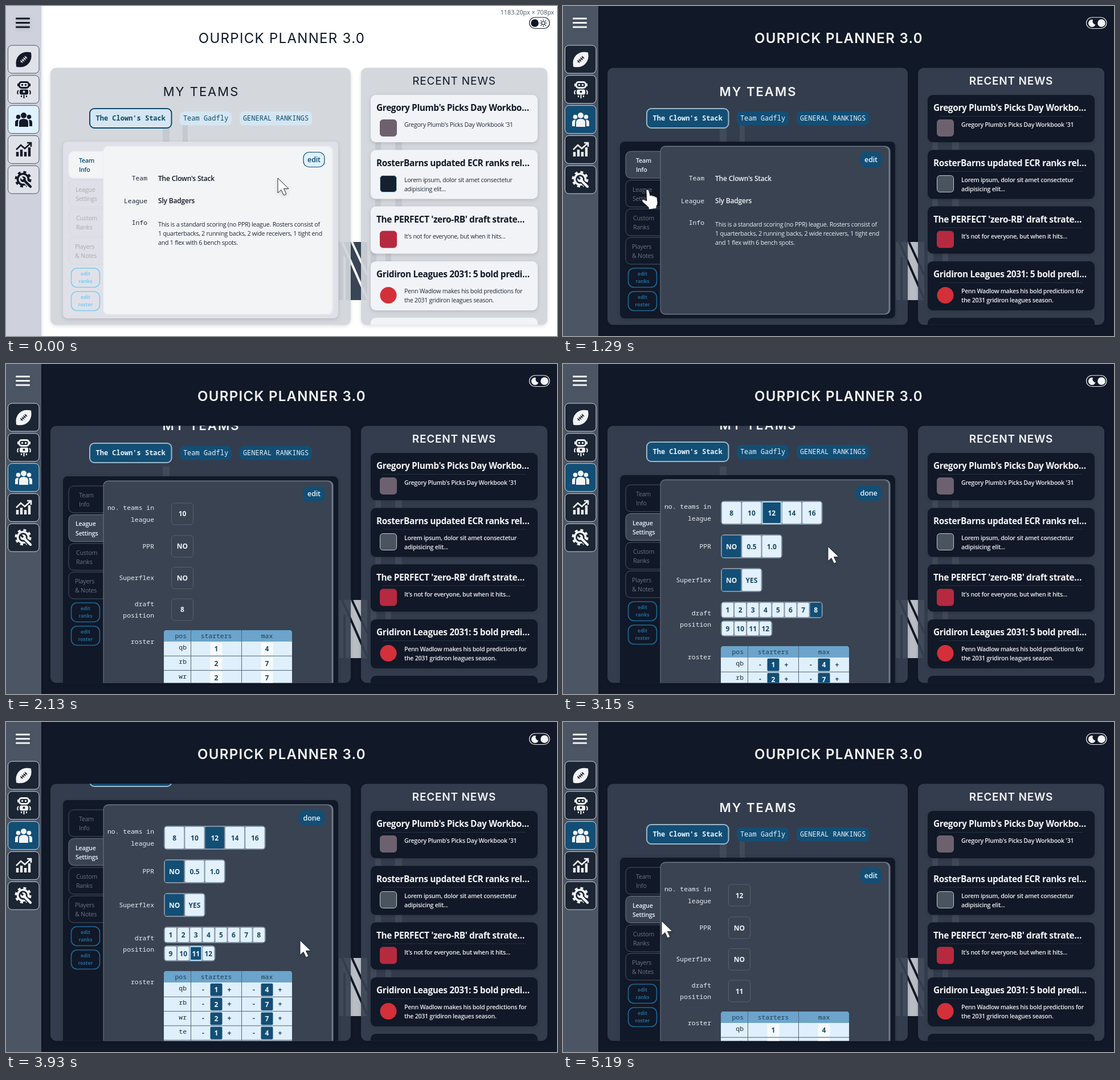
Animation of 967 by 579 pixels, one loop 5.22 s. Source, as an HTML page:

```html
<!DOCTYPE html>
<html lang="en">
<head>
<meta charset="utf-8">
<title>Team dashboard</title>
<style>
html, body { margin: 0; width: 100%; height: 100%; overflow: hidden; }
svg { display: block; width: 100vw; height: 100vh; background: var(--bg); }
text { font-family: "Open Sans", "Noto Sans", sans-serif; fill: var(--ink); white-space: pre; }
.mono { font: 11.4px "Noto Sans Mono", "DejaVu Sans Mono", monospace; fill: var(--body); }
.pill { font-size: 12px; fill: var(--blueInk); }
.bold { font-weight: 700; }
.display { font-family: Inter, sans-serif; font-weight: var(--display); }
.head { font-size: 15.4px; font-weight: 700; letter-spacing: -.35px; }
.copy { font-size: 10.6px; font-weight: var(--weight); letter-spacing: -.27px; fill: var(--body); }
.para { font-size: 10.7px; letter-spacing: -.25px; fill: var(--body); }
.value { font-size: 12px; font-weight: 600; letter-spacing: -.2px; }
.tab { font-size: 10.7px; letter-spacing: -.25px; fill: var(--faint); }
.tab.on { fill: var(--blueInk); font-weight: 600; }
.link { font-size: 8.6px; font-weight: 700; fill: var(--link); }
.action { font-size: 12.6px; font-weight: 600; letter-spacing: -.2px; fill: var(--blueInk); }
.num { font-size: 12px; font-weight: 700; fill: #174766; }
.num.lit { fill: #f0f8ff; }
.num.plain { fill: var(--ink); }
.th { fill: #1d3d55; }
.td { fill: #1f2937; }
.mid { text-anchor: middle; }
.end { text-anchor: end; }
.soft { filter: drop-shadow(0 2px 3px rgba(0, 0, 0, .14)); }
</style>
</head>
<body>
<svg id="stage" viewBox="0 0 967 579" preserveAspectRatio="none"></svg>
<script>
const LOOP = 5220;
const stage = document.getElementById('stage');

// Each entry: light colour, dark colour.
const palette = {
  bg: ['ffffff', '111827'], side: ['cfd2dc', '4b5563'], panel: ['d1d5db', '374151'],
  card: ['e0e1e8', '111827'], news: ['f2f3f6', '111827'], rule: ['f2f3f6', '283241'],
  sheet: ['f3f4f6', '394352'], sheetEdge: ['ebecf0', '717a88'],
  ink: ['111827', 'f3f4f6'], body: ['1f2937', 'eceef1'],
  button: ['e0e2e9', '1b2533'], buttonEdge: ['4b5563', 'd1d5db'],
  active: ['dff1fe', '134e75'], pill: ['d5e6f2', '134e75'],
  blueInk: ['0c4a6e', 'e8f4fd'], pillEdge: ['0c4a6e', '9bb9cb'],
  actionEdge: ['0c4a6e', '134e75'], link: ['7dccf7', '1d6a9a'],
  faint: ['a8abb3', '6b7280'], tabEdge: ['d6d8df', '4b5563'], tabFill: ['dfe0e7', '111827'],
  decor: ['3a4657', 'b9bdc4'], emblem: ['14202f', '4a545f'], emblemEdge: ['9ecdea', 'c3c9d0']
};

const v = name => `var(--${name})`;
const rect = (x, y, w, h, r, fill, extra = '') =>
  `<rect x="${x}" y="${y}" width="${w}" height="${h}" rx="${r}" fill="${fill}" ${extra}/>`;
const text = (x, y, str, cls, extra = '') => `<text x="${x}" y="${y}" class="${cls}" ${extra}>${str}</text>`;
const lines = (x, y, step, strs, cls) => strs.map((s, i) => text(x, y + i * step, s, cls)).join('');
const path = (d, fill, extra = '') => `<path d="${d}" fill="${fill}" ${extra}/>`;
const circle = (x, y, r, fill, extra = '') => `<circle cx="${x}" cy="${y}" r="${r}" fill="${fill}" ${extra}/>`;
const stroke = (color, width = 1) => `stroke="${color}" stroke-width="${width}"`;

function backdrop() {
  const bars = [[275, 180, 12, 62], [310, 205, 9, 37], [648, 160, 10, 192], [683, 160, 12, 192],
    [640, 430, 10, 20], [666, 430, 10, 20]];
  return bars.map(([x, y, w, h]) => rect(x, y, w, h, 0, v('decor'))).join('') +
    rect(584, 414, 50, 102, 0, v('decor')) +
    path('M590 414L634 514M607 414L634 472M594 440V516', 'none', stroke(v('bg'), 4));
}

const icons = [
  `<g transform="rotate(-44 31 94)">${path('M13 94Q20 83 31 83T49 94Q42 105 31 105T13 94Z', v('ink'))}
    ${path('M24 94H38M26 91V97M29.500 91V97M33 91V97M36.500 91V97', 'none', stroke(v('button'), 1.4))}</g>`,
  rect(22, 132, 19, 13, 5, v('ink')) + rect(24.5, 135, 14, 7, 3, v('button')) +
    circle(28.5, 138.5, 1.7, v('ink')) + circle(34.500, 138.5, 1.7, v('ink')) +
    rect(24, 146.500, 15, 9, 3, v('ink')) + circle(31.5, 150.5, 2, v('button')) +
    path('M21 136V141M42 136V141M22 148Q19 150 21 155M41 148Q44 150 42 155M27 157V160M31.500 156V162M36 157V160',
      'none', stroke(v('ink'), 2)),
  circle(31, 192, 5, v('ink')) + circle(21.5, 194.5, 3.8, v('ink')) + circle(40.5, 194.5, 3.8, v('ink')) +
    path('M23 212V204Q23 198 31 198T39 204V212ZM16 211V204Q16 199.500 22 199.500Q21 202 21 211ZM46 211V204Q46 199.500 40 199.500Q41 202 41 211Z', v('ink')),
  path('M20 264V256M27 264V252M34 264V256M41 264V248', 'none', stroke(v('ink'), 4.4)) +
    path('M18 252L26 244L33 250L43 241M37 240H44V247', 'none', stroke(v('ink'), 2.6)),
  circle(30, 304, 9.5, 'none', stroke(v('ink'), 3.6)) +
    circle(30, 304, 12.7, 'none', stroke(v('ink'), 3.6) + ' stroke-dasharray="4.990"') +
    path('M32 306L44 318', 'none', stroke(v('button'), 8)) +
    path('M31 305L43 317', 'none', stroke(v('ink'), 4.4) + ' stroke-linecap="round"') +
    circle(30, 304, 5, v('ink')) + path('M30 304L25 299', 'none', stroke(v('button'), 3.2))
];

function sidebar() {
  return `<g class="soft">${rect(-5, -5, 67, 590, 0, v('side'))}</g>` +
    [22, 29.5, 37].map(y => rect(17, y - 1.5, 25, 3, 1, v('ink'), 'class="soft"')).join('') +
    icons.map((icon, i) => rect(3.5, 69 + i * 52.8, 54.5, 49, 7, v(i === 2 ? 'active' : 'button'),
      stroke(v('buttonEdge'))) + icon).join('');
}

function newsCard(y, h, title, copy, emblem) {
  const cy = y + (copy.length > 1 ? 59.5 : 58);
  return rect(640, y, 293, h, 9, v('news'), 'class="soft"') + text(650, y + 28, title, 'head') +
    rect(661, y + 37, 251, 1, 0, v('rule')) + emblem(671, cy) +
    lines(699, y + 56, 16.3, copy, 'copy');
}

const square = (fill, edge = fill) => (x, y) => rect(x - 14.5, y - 14.5, 29, 29, 5, fill, stroke(edge));

function newsPanel() {
  return rect(623, 108.5, 327, 451, 10, v('panel'), 'opacity=".92" class="soft"') +
    text(786.5, 137.5, 'RECENT NEWS', 'display mid', 'font-size="19" letter-spacing=".8"') +
    `<g clip-path="url(#newsClip)">` +
    newsCard(156, 83, 'Gregory Plumb\'s Picks Day Workbo…', ['Gregory Plumb\'s Picks Day Workbook \'31'], square('#6d6170')) +
    newsCard(252.5, 86, 'RosterBarns updated ECR ranks rel…',
      ['Lorem ipsum, dolor sit amet consectetur', 'adipisicing elit...'], square(v('emblem'), v('emblemEdge'))) +
    newsCard(351.5, 83, 'The PERFECT \'zero-RB\' draft strate…', ['It\'s not for everyone, but when it hits...'], square('#b52a3f')) +
    newsCard(448, 86, 'Gridiron Leagues 2031: 5 bold predi…',
      ['Penn Wadlow makes his bold predictions for', 'the 2031 gridiron leagues season.'],
      (x, y) => circle(x, y, 14.5, '#d3303a')) +
    rect(640, 547, 293, 40, 9, v('news')) + '</g>';
}

function segments(y, h, pitch, labels, picked, focused) {
  const cells = labels.map((label, i) => {
    const x = 278 + i * pitch, on = label === picked;
    return rect(x + 1, y + 2, pitch - 2, h - 4, 2, on ? '#134e75' : '#e2f1fc',
      on && focused ? stroke('#a9d8f3', 2) : '') +
      text(x + pitch / 2, y + h / 2 + 4.5, label, on ? 'num lit mid' : 'num mid');
  });
  return rect(277, y, labels.length * pitch + 2, h, 6, '#8292a1') + cells.join('');
}

function roster(y, editing) {
  const rows = [['qb', 1, 4], ['rb', 2, 7], ['wr', 2, 7], ['te', 1, 4], ['flex', 1, ''], ['k', 1, 3], ['dst', 1, 3]];
  const rowH = 25.3, columns = [369, 458];
  const cell = (cx, cy, n) => {
    if (n === '') return editing ? text(cx, cy + 4, '-  -  +', 'num mid', 'opacity=".15"') : '';
    return rect(cx - 10.5, cy - 11, 21, 22, 2, editing ? '#134e75' : '#f8fbfe') +
      text(cx, cy + 4.5, n, editing ? 'num lit mid' : 'num mid') +
      (editing ? text(cx - 23, cy + 4, '-', 'num mid') + text(cx + 23, cy + 4, '+', 'num mid') : '');
  };
  const height = 20 + rows.length * rowH;
  return rect(277, y, 225, height, 5, '#dfeffb') + path(`M277 ${y + 20}V${y + 5}q0-5 5-5H497q5 0 5 5V${y + 20}Z`, '#6ca4cb') +
    text(317, y + 14, 'pos', 'mono th end') + text(369, y + 14, 'starters', 'mono th mid') + text(458, y + 14, 'max', 'mono th mid') +
    rows.map(([pos, ...counts], i) => {
      const top = y + 20 + i * rowH;
      return text(317, top + 14, pos, 'mono td end') + columns.map((cx, c) => cell(cx, top + 12.8, counts[c])).join('') +
        path(`M277 ${top + rowH}H502`, 'none', stroke('#53677a'));
    }).join('') + path(`M324.500 ${y}V${y + height}M413.500 ${y}V${y + height}`, 'none', stroke('#53677a'));
}

const settingLabels = (ppr, flex, draft, table) =>
  lines(260, 297, 21, ['no. teams in', 'league'], 'mono end') + text(260, ppr, 'PPR', 'mono end') +
  text(260, flex, 'Superflex', 'mono end') + lines(260, draft, 20, ['draft', 'position'], 'mono end') +
  text(260, table, 'roster', 'mono end');

const pages = {
  info: () => text(248, 306, 'Team', 'mono end') + text(267, 307, 'The Clown\'s Stack', 'value') +
    text(248, 345.5, 'League', 'mono end') + text(267, 346, 'Sly Badgers', 'value') + text(248, 384, 'Info', 'mono end') +
    lines(267, 386.5, 16.3, ['This is a standard scoring (no PPR) league. Rosters consist of',
      '1 quarterbacks, 2 running backs, 2 wide receivers, 1 tight end', 'and 1 flex with 6 bench spots.'], 'para'),
  view: s => settingLabels(365, 420, 466, 532) +
    [[285, s.teams], [342, 'NO'], [397.5, 'NO'], [453, s.slot]].map(([y, value]) =>
      rect(290.5, y, 38, 38, 5, v('sheet'), stroke('#576170')) + text(309.5, y + 23.5, value, 'num plain mid')).join('') +
    roster(508, false),
  edit: s => {
    const slots = Array.from({ length: s.teams }, (_, i) => i + 1);
    return settingLabels(367, 426, 484, 561) +
      segments(283, 42, 35.3, [8, 10, 12, 14, 16], s.teams, s.focus === 'teams') +
      segments(342, 42, 35.3, ['NO', '0.5', '1.0'], 'NO') + segments(401, 42, 35.3, ['NO', 'YES'], 'NO') +
      segments(460, 29, 22.1, slots.slice(0, 8), s.slot, s.focus === 'slot') +
      segments(493, 28, 22.1, slots.slice(8), s.slot, s.focus === 'slot') + roster(538, true);
  }
};

function tab(y, x, labels, on) {
  return path(`M171 ${y}H120q-10 0-10 10V${y + 37}q0 10 10 10H171`, v(on ? 'sheet' : 'tabFill'),
    stroke(v(on ? 'sheetEdge' : 'tabEdge'))) + lines(x, y + 20, 16.2, labels, on ? 'tab on' : 'tab');
}

function teamPill(x, y, w, h, label, on) {
  return rect(x, y, w, h, 8, v('pill'), on ? stroke(v('pillEdge'), 2) : '') +
    text(x + w / 2, 201, label, 'mono pill mid' + (on ? ' bold' : ''), 'style="fill:var(--blueInk);font-size:12px"');
}

function teamContent(s) {
  const info = s.page === 'info', tall = info ? 0 : 400;
  const label = s.page === 'edit' ? 'done' : 'edit', w = s.page === 'edit' ? 45 : 37;
  return text(342.5, 157.5, 'MY TEAMS', 'display mid', 'font-size="22" letter-spacing="2"') +
    teamPill(147, 180, 143.5, 34, 'The Clown\'s Stack', true) +
    teamPill(305, 185, 91, 24.5, 'Team Gadfly') + teamPill(410, 185, 127, 24.5, 'GENERAL RANKINGS') +
    rect(100, 238, 483, 310 + tall, 8, v('card'), 'class="soft"') +
    tab(255, 128, ['Team', 'Info'], info) + tab(305.5, 122, ['League', 'Settings'], !info) +
    tab(356, 123, ['Custom', 'Ranks']) + tab(406, 121, ['Players', '&amp; Notes']) +
    [[460, 'ranks'], [501, 'roster']].map(([y, word]) => rect(114.5, y, 50, 33.5, 10, 'none', stroke(v('link'), 1.6)) +
      lines(139.5, y + 13, 13, ['edit', word], 'link mid')).join('') +
    rect(170.500, 245.5, 404, 296 + tall, 9, v('sheetEdge')) + rect(171.5, 247, 400, 293 + tall, 8, v('sheet')) +
    rect(559 - w, 256.5, w, 26, 10, v('active'), stroke(v('actionEdge'), 1.2)) +
    text(559 - w / 2, 273.5, label, 'action mid') + pages[s.page](s);
}

const sunRays = Array.from({ length: 8 }, (_, i) => {
  const c = Math.cos(i * Math.PI / 4), s = Math.sin(i * Math.PI / 4);
  return `M${943 + 4.5 * c} ${30 + 4.5 * s}L${943 + 6.5 * c} ${30 + 6.5 * s}`;
}).join('');

stage.innerHTML = `
  <defs>
    <clipPath id="teamClip">${rect(78, 108.5, 527, 451, 10, '#000')}</clipPath>
    <clipPath id="newsClip">${rect(623, 108.5, 327, 451, 10, '#000')}</clipPath>
  </defs>
  ${backdrop()}${sidebar()}
  ${text(484, 65, 'OURPICK PLANNER 3.0', 'display mid', 'font-size="24" letter-spacing="1.3"')}
  ${rect(918.5, 20, 35.5, 19.5, 9.7, v('bg'), stroke(v('ink'), 1.2))}
  <g id="sun">${circle(943, 30, 3, 'none', stroke(v('ink'), 1.2))}${path(sunRays, 'none', stroke(v('ink'), 1.2))}</g>
  <g id="moon">${path('M930 24A6.500 6.500 0 1 0 934.500 32.500A6 6 0 0 1 930 24Z', v('ink'))}</g>
  ${circle(0, 30, 6.8, v('ink'), 'id="knob"')}
  <g id="size">${text(962, 14.5, '1183.20px × 708px', 'end', 'font-size="10.8" style="fill:#4b5563"')}</g>
  ${rect(78, 108.5, 527, 451, 10, v('panel'), 'opacity=".92" class="soft"')}
  <g clip-path="url(#teamClip)"><g id="team"></g></g>
  ${newsPanel()}
  <g id="arrow">${path('M0 0V26L6 20.500L10.500 30L15 28L10.500 18.500H19Z', '#fff', stroke('#1f2937', 1) + ' class="soft"')}</g>
  <g id="hand">${path('M-2 1.500Q0-1.500 2.500 1.500L5 11Q8 9 9.500 11.500Q12 10 13.500 13Q16 12 17 15L18 23Q18 27 16 29V33L3 35L2 31L-8 22Q-11 18-7 17.500L-1 20Z', '#fff', stroke('#1f2937', .8) + ' class="soft"')}</g>`;

const part = Object.fromEntries(['sun', 'moon', 'knob', 'size', 'team', 'arrow', 'hand']
  .map(id => [id, document.getElementById(id)]));

const ease = p => p * p * (3 - 2 * p);
const clamp = p => Math.min(1, Math.max(0, p));

// Keys are [time, ...values].
function track(keys, t) {
  const next = keys.findIndex(k => k[0] > t);
  if (next < 1) return (next ? keys[keys.length - 1] : keys[0]).slice(1);
  const a = keys[next - 1], b = keys[next], p = ease((t - a[0]) / (b[0] - a[0]));
  return a.slice(1).map((value, i) => value + (b[i + 1] - value) * p);
}

const pointerKeys = [[0, 477, 302], [540, 934, 30], [850, 934, 30], [1280, 148, 322], [1450, 148, 322],
  [1700, 300, 330], [2350, 480, 290], [2540, 538, 228], [2640, 538, 228], [2860, 366, 262], [2960, 366, 262],
  [3150, 465, 320], [3420, 465, 320], [3690, 333, 407], [3790, 333, 407], [3930, 516, 383], [4120, 520, 360],
  [4390, 535, 147], [4540, 535, 147], [5160, 173, 349]];
const scrollKeys = [[1700, 0], [2110, 41], [2400, 43], [3180, 43], [3500, 101], [3950, 101], [4200, 130.5], [4600, 130.5], [5080, 0]];
const handSpans = [[500, 900], [1220, 1500], [2500, 2680], [2820, 3000], [3650, 3820], [4350, 4580]];
const within = (t, [from, to]) => t >= from && t < to;

function stateAt(t) {
  return {
    page: t < 1400 ? 'info' : within(t, [2600, 4500]) ? 'edit' : 'view',
    teams: t < 2920 ? 10 : 12,
    slot: t < 3750 ? 8 : 11,
    focus: within(t, [2920, 3400]) ? 'teams' : within(t, [3750, 4100]) ? 'slot' : ''
  };
}

const channels = hex => [0, 2, 4].map(i => parseInt(hex.slice(i, i + 2), 16));

function paint(dark) {
  for (const [name, [light, night]] of Object.entries(palette)) {
    const from = channels(light), to = channels(night);
    stage.style.setProperty('--' + name, `rgb(${from.map((c, i) => Math.round(c + (to[i] - c) * dark))})`);
  }
  stage.style.setProperty('--weight', dark > .5 ? 600 : 400);
  stage.style.setProperty('--display', dark > .5 ? 600 : 400);
  part.sun.setAttribute('opacity', 1 - dark);
  part.moon.setAttribute('opacity', dark);
  part.knob.setAttribute('cx', 928 + 17 * dark);
}

let shownState = '', shownTheme = -1;

function render(t) {
  const dark = ease(clamp((t - 780) / 300));
  if (dark !== shownTheme) paint(shownTheme = dark);

  const state = stateAt(t), key = JSON.stringify(state);
  if (key !== shownState) {
    part.team.innerHTML = teamContent(state);
    shownState = key;
  }
  part.team.setAttribute('transform', `translate(0 ${-track(scrollKeys, t)[0]})`);

  const [x, y] = track(pointerKeys, t);
  const hidden = within(t, [1700, 2350]), hand = handSpans.some(span => within(t, span));
  for (const [node, shown] of [[part.arrow, !hidden && !hand], [part.hand, !hidden && hand]]) {
    node.setAttribute('transform', `translate(${x} ${y})`);
    node.setAttribute('visibility', shown ? 'visible' : 'hidden');
  }
  part.size.setAttribute('visibility', t < 400 ? 'visible' : 'hidden');
}

const start = performance.now();
function tick(now) {
  render(Math.max(0, now - start) % LOOP);
  requestAnimationFrame(tick);
}
render(0);
requestAnimationFrame(tick);
</script>
</body>
</html>
```
